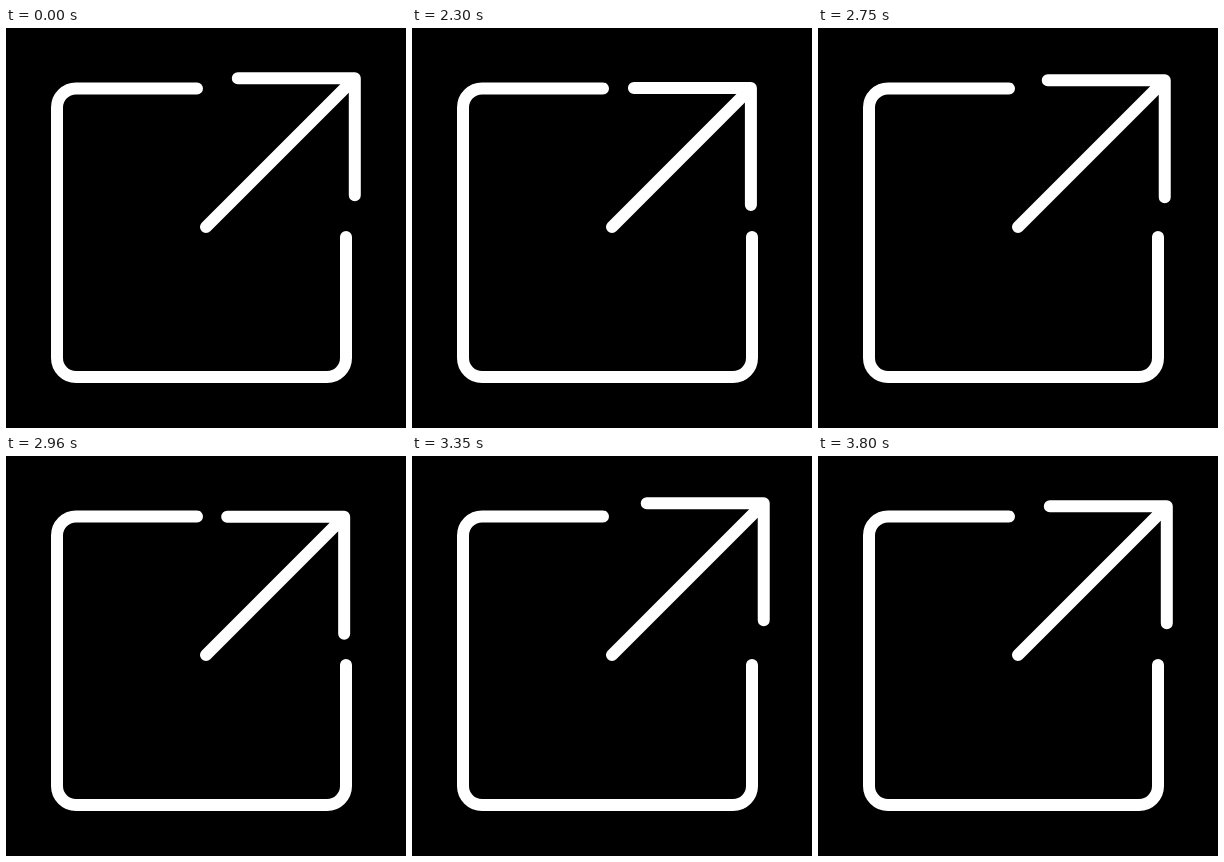
Write an HTML page that moves like this. It is 400 by 400 pixels and loops after 3.83 s.

```html
<!DOCTYPE html>
<html>
<head>
<meta charset="utf-8">
<style>
html, body { margin: 0; height: 100%; overflow: hidden; background: #000; }
svg { display: block; width: 100vw; height: 100vh; }
path { fill: none; stroke: #fff; stroke-width: 12; stroke-linecap: round; stroke-linejoin: round; }
</style>
</head>
<body>
<svg viewBox="0 0 400 400">
  <path d="M191 60.5H70a19 19 0 0 0-19 19V330a19 19 0 0 0 19 19H321a19 19 0 0 0 19-19V209"/>
  <path id="arrow"/>
</svg>
<script>
const LOOP = 3830, REST = 2000, STEP = 30;
const IN = -11.2, OUT = 6.6;
// [step, shift of the tip along the diagonal]
const keys = [[0, 0], [8, IN], [19.5, OUT], [30.7, IN], [42, OUT], [52, IN], [60, 0]];
const arrow = document.getElementById("arrow");

const ease = u => (1 - Math.cos(Math.PI * u)) / 2;

function shiftAt(step) {
  const n = Math.max(1, keys.findIndex(k => k[0] >= step));
  const [s0, v0] = keys[n - 1], [s1, v1] = keys[n];
  return v0 + (v1 - v0) * ease((step - s0) / (s1 - s0));
}

function draw(now) {
  const time = now % LOOP;
  const step = Math.min(60, Math.max(0, Math.floor((time - REST) / STEP)));
  const shift = shiftAt(step);
  const x = 348.8 + shift, y = 50.2 - shift;
  arrow.setAttribute("d", `M${x - 117} ${y}H${x}V${y + 117}M200 199L${x} ${y}`);
}

const start = performance.now();
function tick() {
  draw(performance.now() - start);
  requestAnimationFrame(tick);
}
tick();
</script>
</body>
</html>
```
